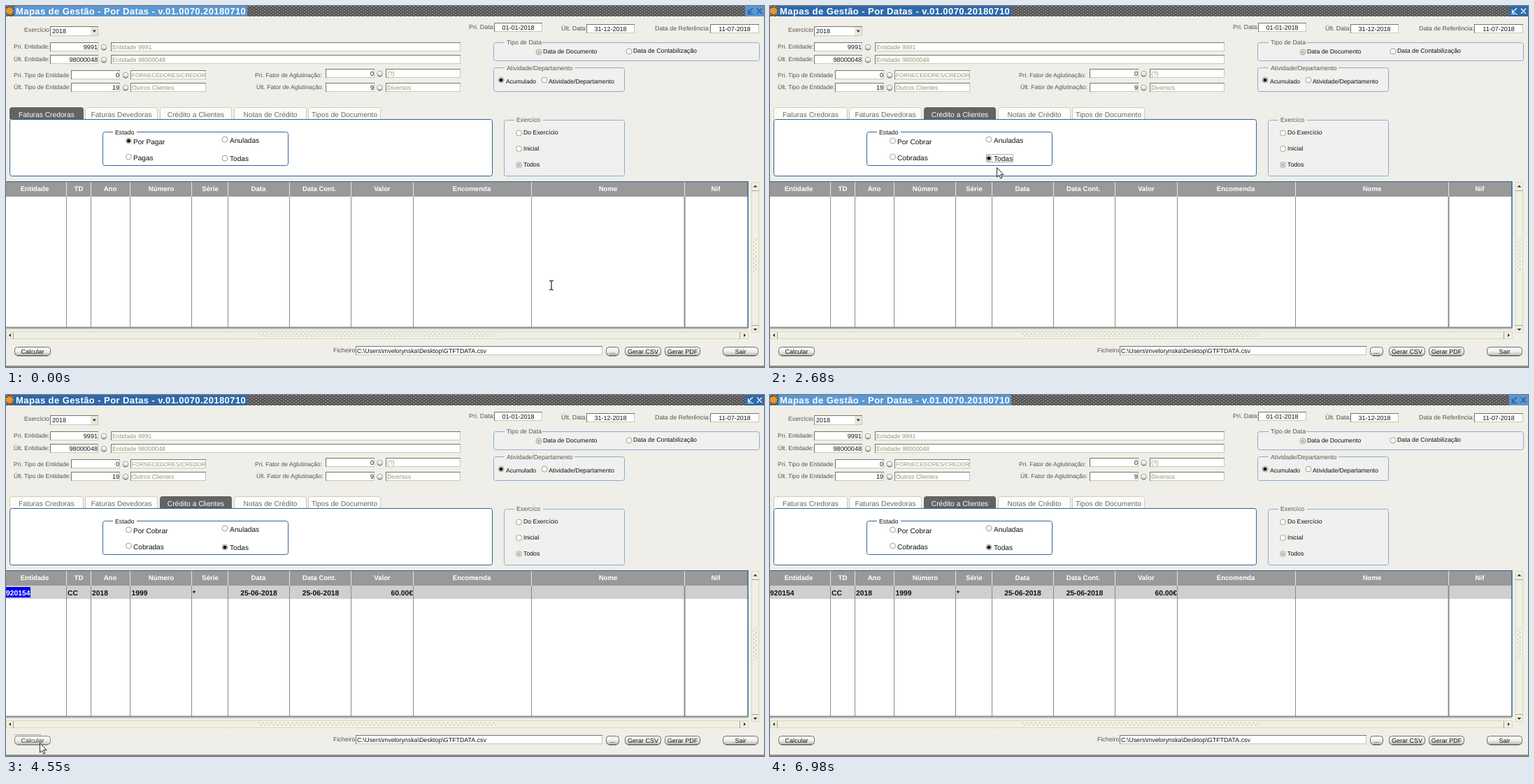
Write an HTML page that moves like this. It is 1084 px wide and 517 px high and loops after 7060 ms.

```html
<!DOCTYPE html>
<html lang="pt">
<head>
<meta charset="utf-8">
<title>Mapas de Gestão</title>
<style>
html, body { margin: 0; width: 100%; height: 100%; overflow: hidden; background: #efeee8; }
svg { display: block; width: 100vw; height: 100vh; }
text { font-family: "Liberation Sans", Arial, sans-serif; white-space: pre; text-rendering: geometricPrecision; }
.caption text { letter-spacing: .42px; }
</style>
</head>
<body>
<svg id="stage" viewBox="0 0 1084 517" preserveAspectRatio="none"></svg>
<script>
const LOOP = 7060;
const BLUE = '#2f6499', PALE = '#8fabd0', OLIVE = '#95946a', INK = '#111', LABEL = '#55554f';
const EDGE = '#c9c8b4', DARK_EDGE = '#77766a', OFF_DOT = '#bebdb3';

// y is the middle of the line of text
const text = (x, y, s, size = 8.8, fill = INK, more = '') =>
  `<text x="${x}" y="${y + size * 0.36}" font-size="${size}" fill="${fill}" ${more}>${s}</text>`;
const mid = 'text-anchor="middle"', end = 'text-anchor="end"', bold = 'font-weight="700"';
const rect = (x, y, w, h, fill, stroke = 'none', r = 0, more = '') =>
  `<rect x="${x}" y="${y}" width="${w}" height="${h}" rx="${r}" fill="${fill}" stroke="${stroke}" ${more}/>`;
const line = (x1, y1, x2, y2, c, w = 1) =>
  `<path d="M${x1} ${y1}L${x2} ${y2}" stroke="${c}" stroke-width="${w}" fill="none"/>`;
const group = (id, body) => `<g id="${id}">${body}</g>`;
const dots = (x, y, w, h, c) =>
  rect(x, y, w, h, 'none', c, 0, 'stroke-width=".8" stroke-dasharray="1.5 1"');

const box = (x, y, w, h) => rect(x + .5, y + .5, w - 1, h - 1, '#fff', EDGE) +
  line(x, y + .5, x + w, y + .5, DARK_EDGE) + line(x + .5, y, x + .5, y + h, DARK_EDGE);

function field(x, y, w, s, align = 'left', fill = INK, size = 9.1) {
  const h = 13;
  const tx = align === 'left' ? x + 2 : align === 'right' ? x + w - 1 : x + w / 2;
  const anchor = { left: '', right: end, center: mid }[align];
  return box(x, y, w, h) +
    `<svg x="${x}" y="${y}" width="${w}" height="${h}" viewBox="${x} ${y} ${w} ${h}">` +
    text(tx, y + 7, s, size, fill, anchor) + '</svg>';
}

const lov = (x, y) =>
  `<circle cx="${x}" cy="${y}" r="3.8" fill="url(#btn)" stroke="#9a9a92" stroke-width=".9"/>` +
  `<path d="M${x - 3.5} ${y + 2}A4 4 0 0 0 ${x + 3.5} ${y + 2}" fill="none" stroke="#66665f" stroke-width=".9"/>`;

const ring = (x, y) =>
  `<circle cx="${x}" cy="${y}" r="4" fill="#fffef8" stroke="#96958a" stroke-width=".9"/>`;
const bullet = (x, y, c = '#111') => `<circle cx="${x}" cy="${y}" r="2.6" fill="${c}"/>`;
const radio = (x, y, s, size, tx, ty) => ring(x, y) + text(tx, ty, s, size);

function frame(x, y, w, h, title, tx, tw, color, fill, ty = y, titleFill = LABEL) {
  return rect(x + .5, y + .5, w, h, fill, color, 3) +
    rect(tx - 3, y - 1, tw + 6, 3, fill) + text(tx, ty, title, 8.8, titleFill);
}

const button = (id, x, w, s) => group(id,
  rect(x + .5, 488.5, w, 12, 'url(#btn)', '#6b6b65', 4) +
  line(x + 4, 501, x + w - 3, 501, '#55554f') +
  text(x + w / 2 + .5, 495, s, 9, INK, mid));

function titleBar() {
  return rect(0, 0, 1084, 15, 'url(#bumps)') +
    `<g class="caption">${rect(12, 0, 333, 15, 'currentColor')}${rect(1057, 0, 27, 15, 'currentColor')}` +
    text(14, 7.5, 'Mapas de Gestão - Por Datas - v.01.0070.20180710', 13, '#fff', bold) + '</g>' +
    '<circle cx="5" cy="7" r="5" fill="#ea942f"/>' +
    group('marks', '<path d="M1068 3L1062 9M1061.5 5V9.5H1066M1060 11.5H1069M1074 3.5L1081 11M1081 3.5L1074 11" ' +
      'stroke="currentColor" stroke-width="1.2" fill="none"/>') +
    line(0, 15.5, 1084, 15.5, '#fbfbf7');
}

function form() {
  // label, value box, list button, description box
  const row = (ly, y, name, lx, fx, w, value, bx, info, ix, iw, size = 8.75) =>
    text(lx, ly, name, 8.55, LABEL) + field(fx, y, w, value, 'right') +
    lov(bx, y + 7) + field(ix, y, iw, info, 'left', OLIVE, size);
  const date = (lx, ly, name, x, y, w, value) =>
    text(lx, ly, name, 8.9, LABEL) + field(x, y, w, value, 'center', INK, 9);
  return text(26, 34, 'Exercício', 8.75, LABEL) + box(63, 29, 69, 14) + text(66, 36, '2018', 9) +
    rect(121, 30, 10, 12, '#e9e8dd') + '<path d="M123.5 34.5h5.5l-2.75 3.5z" fill="#44443c"/>' +
    row(58, 52, 'Pri. Entidade:', 11, 63, 69, '9991', 140, 'Entidade 9991', 150, 500) +
    row(76, 70, 'Últ. Entidade:', 11, 63, 69, '98000048', 140, 'Entidade 98000048', 150, 500) +
    row(98.5, 92, 'Pri. Tipo de Entidade', 11, 93, 70, '0', 171, 'FORNECEDORES/CREDORES', 178, 108, 8.1) +
    row(115.5, 110, 'Últ. Tipo de Entidade:', 11, 93, 70, '19', 171, 'Outros Clientes', 178, 108) +
    row(98.5, 90, 'Pri. Fator de Aglutinação:', 356, 457, 70, '0', 534.5, '(?)', 543, 107) +
    row(116, 110, 'Últ. Fator de Aglutinação:', 358, 457, 70, '9', 534.5, 'Diversos', 543, 107) +
    date(662, 30, 'Pri. Data:', 698, 24, 69, '01-01-2018') +
    date(794, 32, 'Últ. Data:', 830, 26, 69, '31-12-2018') +
    date(928, 32, 'Data de Referência:', 1007, 26, 70, '11-07-2018');
}

function options() {
  const soft = '#f0f0ee';
  return frame(697, 52, 380, 26, 'Tipo de Data', 716, 48, PALE, soft) +
    radio(762, 66, 'Data de Documento', 8.7, 768, 64.5) + bullet(762, 66, OFF_DOT) +
    radio(891, 65, 'Data de Contabilização', 8.8, 897, 64) +
    frame(697, 88, 187, 34, 'Atividade/Departamento', 716, 94, PALE, soft, 89) +
    radio(708, 106, 'Acumulado', 8.65, 715, 108) + bullet(708, 106) +
    radio(770, 106, 'Atividade/Departamento', 8.75, 776, 108) +
    frame(712, 163, 172, 80, 'Exercíco', 730, 35, PALE, soft) +
    radio(733.5, 182, 'Do Exercício', 8.75, 740, 181) +
    radio(733.5, 204.5, 'Inicial', 8.75, 740, 203.5) +
    radio(733.5, 227.5, 'Todos', 8.75, 740, 226.5) + bullet(733.5, 227.5, OFF_DOT);
}

const tabs = [
  [5, 106, 'Faturas Credoras'], [113, 104, 'Faturas Devedoras'], [220, 103, 'Crédito a Clientes'],
  [326, 104, 'Notas de Crédito'], [432, 104, 'Tipos de Documento']
];
function tab([x, w, s], on) {
  const shape = `M${x + .5} 162V148.5Q${x + .5} 145.5 ${x + 3.5} 145.5H${x + w - 3}Q${x + w - .5} 145.5 ${x + w - .5} 148.5V162`;
  return `<path d="${shape}" fill="${on ? '#636363' : '#fcfcf8'}" stroke="${on ? '#636363' : '#cfceb9'}"/>` +
    text(x + w / 2, 155, s, 10.25, on ? '#fff' : '#6b6b66', mid);
}

function panel() {
  return tabs.map(t => tab(t, false)).join('') +
    group('tabFirst', tab(tabs[0], true)) +
    group('tabThird', tab(tabs[2], true)) +
    rect(5.5, 162.5, 690, 81, '#fff', BLUE, 3) +
    group('tabFocus', dots(230, 148, 83, 13, '#ddd')) +
    frame(138, 180, 265, 48, 'Estado', 156, 28, '#34659c', '#fff', 181, INK) +
    ring(175.5, 193) + ring(175.5, 216) +
    radio(313, 191, 'Anuladas', 10.1, 320, 192.5) + radio(313, 218, 'Todas', 10.1, 320, 218.5) +
    group('suppliers', text(182, 194, 'Por Pagar', 10.1) + text(182, 217, 'Pagas', 10.1)) +
    group('clients', text(182, 194, 'Por Cobrar', 10.1) + text(182, 217, 'Cobradas', 10.1)) +
    group('pickFirst', bullet(175.5, 193)) + group('pickAll', bullet(313, 218)) +
    group('allFocus', dots(309.5, 212.5, 38, 11, '#555'));
}

function table() {
  const cuts = [87, 122, 178, 266, 318, 406, 494, 583, 752, 971];
  const heads = [[41, 'Entidade'], [104, 'TD'], [149, 'Ano'], [222, 'Número'], [292, 'Série'], [361, 'Data'],
    [448, 'Data Cont.'], [538, 'Valor'], [666, 'Encomenda'], [861, 'Nome'], [1015, 'Nif']];
  const cell = (x, s, more = '') => text(x, 283, s, 10.3, INK, bold + ' ' + more);
  return rect(0, 251, 1061, 22, '#999') + rect(0, 273, 1061, 187, '#fff') +
    group('row', rect(0, 273, 1061, 19, '#cfcfcf') + cell(0, '920154') + cell(88, 'CC') + cell(123, '2018') +
      cell(179.5, '1999') + cell(267, '*') + cell(361.5, '25-06-2018', mid) + cell(450, '25-06-2018', mid) +
      cell(582, '60.00€', end)) +
    group('picked', rect(0, 275, 35, 15, '#0000ee') + text(0, 283, '920154', 10.3, '#fff', bold)) +
    cuts.map(x => line(x - .5, 273, x - .5, 460, '#8b8b8b', x === 971 ? 2 : 1) +
      line(x - .5, 252, x - .5, 273, '#e6e6e6')).join('') +
    heads.map(([x, s]) => text(x, 262, s, 9.65, '#fff', bold + ' ' + mid)).join('') +
    line(0, 251.5, 1061, 251.5, BLUE) +
    line(1061, 251, 1061, 461, BLUE, 1.5) + line(0, 460.5, 1061, 460.5, '#888', 2) +
    line(0, 462.5, 1061, 462.5, '#c7c6bb');
}

function scrollbars() {
  const track = '#f1f0e2', rim = '#dad9c4', split = '#a3a28f';
  return rect(.5, 466.5, 1061, 10, track, rim) + rect(1066.5, 252.5, 10, 215, track, rim) +
    rect(360, 469, 341, 6, 'url(#grip)') + rect(1069, 332, 6, 48, 'url(#grip)') +
    line(10.5, 467, 10.5, 477, split) + line(1049.5, 467, 1049.5, 477, split) +
    line(1066, 264.5, 1077, 264.5, split) + line(1066, 457.5, 1077, 457.5, split) +
    '<path d="M4 471.5l3-2.5v5zM1058 471.5l-3-2.5v5zM1071.5 256.5l3 3h-6zM1071.5 465l3-3h-6z" fill="#33332b"/>';
}

function footer() {
  return button('calc', 12, 51, 'Calcular') + group('calcFocus', line(12, 486.5, 50, 486.5, '#aaa99e')) +
    text(468, 493, 'Ficheiro', 8.85, LABEL) +
    field(500, 487, 353, 'C:\\Users\\mvelorynska\\Desktop\\GTFTDATA.csv', 'left', INK, 8.86) +
    button('more', 858, 18, '...') + button('csv', 885, 51, 'Gerar CSV') +
    button('pdf', 942, 50, 'Gerar PDF') + button('exit', 1025, 50, 'Sair') +
    rect(322, 486, 1, 1, '#bbb') + line(0, 516, 1084, 516, '#33332f', 1.2);
}

const stage = document.getElementById('stage');
stage.innerHTML = `<defs>
  <linearGradient id="btn" x1="0" y1="0" x2="0" y2="1"><stop offset="0" stop-color="#fff"/><stop offset=".5" stop-color="#f0f0ec"/><stop offset="1" stop-color="#bcbcb5"/></linearGradient>
  <pattern id="bumps" width="6" height="4" patternUnits="userSpaceOnUse"><path d="M0 0h6v4H0z" fill="#565656"/><path d="M0 0h2v1H0zM3 2h2v1H3z" fill="#a5a498"/></pattern>
  <pattern id="grip" width="6" height="6" patternUnits="userSpaceOnUse"><path d="M1 1h1.2v1.2H1zM4 4h1.2v1.2H4z" fill="#a9a88f"/></pattern>
  </defs>` + rect(0, 0, 1084, 517, '#efeee8') +
  titleBar() + form() + options() + panel() + table() + scrollbars() + footer() +
  group('arrow', '<path d="M.5 .5V14L3.6 11.2L5.7 15.9L7.8 15L5.7 10.5H10Z" fill="#fff" stroke="#111" stroke-width=".9"/>') +
  group('beam', '<path d="M-3 -6.5H-1L0 -5.5L1 -6.5H3M0 -5.5V5.5M-3 6.5H-1L0 5.5L1 6.5H3" fill="none" stroke="#222" stroke-width="1.2"/>');

const $ = id => document.getElementById(id);
const caption = stage.querySelectorAll('.caption rect');

// visible intervals in ms
const shown = {
  tabFirst: [0, 1250], suppliers: [0, 1250], tabThird: [1250, LOOP], clients: [1250, LOOP],
  tabFocus: [1250, 2360], pickFirst: [0, 2360], pickAll: [2360, LOOP], allFocus: [2360, 3860],
  calcFocus: [3860, 5090], row: [4550, LOOP], picked: [4550, 6980]
};

// start, end, steps, from, bend, to, ease-out power
const moves = [
  [220, 760, 8, [780, 400], [560, 265], [298, 162], 1.4],
  [930, 1180, 4, [298, 162], [293, 158], [290, 152], 1],
  [1640, 2290, 9, [290, 152], [349, 193], [324, 222], 1],
  [2680, 3300, 9, [324, 222], [341, 251], [48, 498], 1],
  [5090, 5510, 6, [48, 498], [241, 460], [441, 434], 1.4],
  [5650, 6350, 10, [441, 434], [830, 410], [1050, 494], 1.2]
];

function pointer(t) {
  let spot = moves[0][3];
  for (const [t0, t1, n, a, b, c, pow] of moves) {
    if (t < t0) break;
    const k = Math.min(n, Math.floor((t - t0) / ((t1 - t0) / (n - 1)) + .3) + 1);
    const u = 1 - Math.pow(1 - k / n, pow), v = 1 - u;
    spot = a.map((p, i) => v * v * p + 2 * u * v * b[i] + u * u * c[i]);
  }
  return spot;
}

function draw(t) {
  for (const id in shown) $(id).style.display = t >= shown[id][0] && t < shown[id][1] ? '' : 'none';
  const active = t >= 1250 && t < 6980;
  caption.forEach(r => r.style.color = active ? '#2f69aa' : '#5b97d2');
  $('marks').style.color = active ? '#fff' : '#24568c';
  const pressed = t >= 3860 && t < 3930;
  $('calc').style.transform = pressed ? 'translate(.5px,.5px)' : '';
  $('calc').style.opacity = t >= 3300 && t < 5090 ? .8 : 1;
  $('exit').style.opacity = t >= 6350 && t < 6430 ? .8 : 1;

  const [x, y] = pointer(t);
  const beam = x < 1060 && y > 274 && y < 460;
  const visible = t < 6430;
  $('beam').style.display = visible && beam ? '' : 'none';
  $('arrow').style.display = visible && !beam ? '' : 'none';
  $(beam ? 'beam' : 'arrow').setAttribute('transform', `translate(${Math.round(x)} ${Math.round(y)})`);
}

const start = performance.now();
function tick() {
  draw((performance.now() - start) % LOOP);
  requestAnimationFrame(tick);
}
draw(0);
requestAnimationFrame(tick);
</script>
</body>
</html>
```
